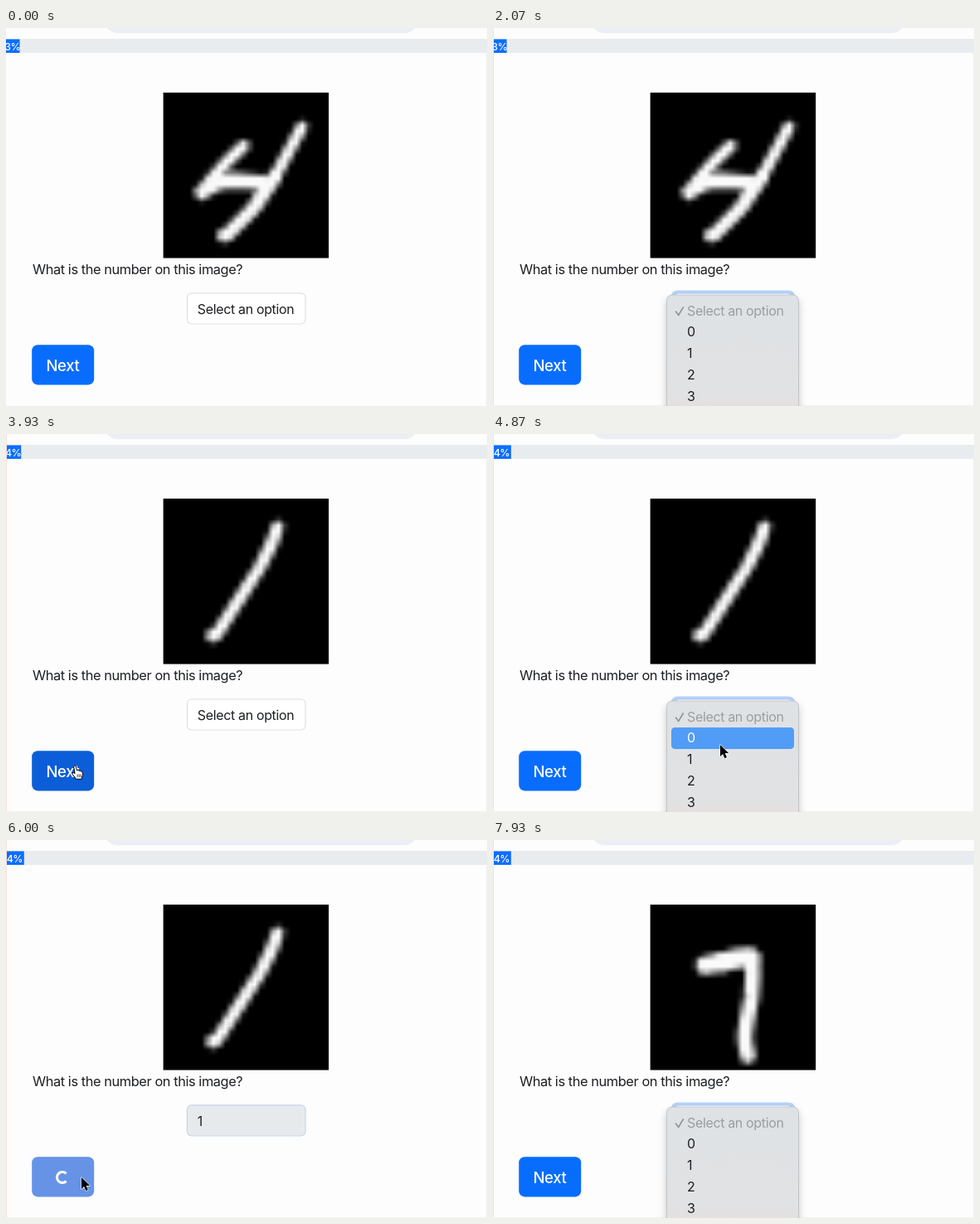
Animation of 580 by 456 pixels, one loop 8 s. Source, as an HTML page with a canvas:

```html
<!DOCTYPE html>
<html lang="en">
<head>
<meta charset="utf-8">
<title>Digit quiz</title>
<style>
  html, body { margin: 0; width: 100%; height: 100%; overflow: hidden; background: #fdfdfd; }
  canvas { position: absolute; left: 189px; top: 78px; width: 200px; height: 200px; transform: translate(.4px, -.3px); }
  svg { position: absolute; left: 0; top: 0; }
  text { font-family: Inter, "Open Sans", sans-serif; font-size: 16px; font-weight: 430; letter-spacing: -.35px; fill: #1d1f22; }
  #ask { font-size: 16.4px; letter-spacing: -.43px; }
  #next { font-size: 18.5px; font-weight: 460; letter-spacing: -.4px; fill: #fff; }
  #percent { font-size: 12.3px; font-weight: 460; letter-spacing: -.4px; fill: #fff; text-anchor: middle; }
</style>
</head>
<body>
<canvas id="digit" width="28" height="28"></canvas>
<svg width="580" height="456" viewBox="0 0 580 456">
  <defs>
    <linearGradient id="glass" gradientUnits="userSpaceOnUse" x1="0" y1="322" x2="0" y2="460">
      <stop offset="0" stop-color="#dfe2e4"/>
      <stop offset=".86" stop-color="#e0e2e4"/>
      <stop offset="1" stop-color="#e6dfde"/>
    </linearGradient>
    <filter id="shade" x="-20%" y="-20%" width="140%" height="140%">
      <feDropShadow dx="0" dy="5" stdDeviation="5" flood-opacity=".22"/>
    </filter>
  </defs>

  <rect x="118" y="-28" width="379" height="34.2" rx="17" fill="#eceef5"/>
  <rect y="13" width="580" height="17" fill="#e9ecef"/>
  <rect id="bar" y="13.5" height="16.5" fill="#0d6efd"/>
  <text id="percent" y="26.5"></text>
  <path d="M579.5 30V456" stroke="#f0f0f1"/>
  <g id="edge" fill="none" stroke="#fbdfda"><path d="M.5 0V456"/><path d="M0 455.5H580" stroke="#f8f0ef"/></g>

  <text id="ask" x="32" y="297">What is the number on this image?</text>

  <rect id="ring" x="214.5" y="316.5" width="150" height="44" rx="8" fill="#b6d2fb"/>
  <rect id="box" x="218.4" y="319.8" width="142.7" height="37.2" rx="5.5" stroke-width="1.2"/>
  <text id="value" x="230.8" y="344.5"></text>

  <rect id="button" x="31.2" y="382.2" width="75" height="48.2" rx="7"/>
  <text id="next" x="48.5" y="413.5">Next</text>
  <path id="spin" d="M72.6 402.4A6.5 6.5 0 1 0 72.6 411.6" fill="none" stroke="#fff" stroke-width="3"/>

  <g id="menu">
    <rect x="209.5" y="322" width="159" height="300" rx="6.5" fill="url(#glass)" stroke="#b9bcbf" stroke-width=".8" filter="url(#shade)"/>
    <rect id="mark" x="215" width="148" height="26" rx="4.5" fill="#519cf6"/>
    <path d="M220.5 342.2l3.2 4.2 5.6-9.4" fill="none" stroke="#8f9194" stroke-width="1.6" stroke-linecap="round"/>
    <text x="234" y="346.5" style="fill:#9b9da0">Select an option</text>
    <g id="rows"></g>
  </g>

  <g id="cursor">
    <path id="arrow" d="M0 0V15.5L3.5 12.2L6 18L8.8 16.8L6.3 11.2H11.3Z" fill="#000" stroke="#fff" stroke-width="1.3" stroke-linejoin="round" paint-order="stroke"/>
    <g id="hand">
      <path d="M0 1.5Q1.5-1 3 1.5L4.2 7Q5.8 5.6 7 7.4Q8.6 6.4 9.6 8.2Q11.6 7.6 12 10V13L10.4 18.5H3.4L-1.8 12Q-2.6 9.6-.4 9.8L1.6 11.2Z" fill="#fff" stroke="#000" stroke-width="1.1" stroke-linejoin="round"/>
      <path d="M5 12V16M7.2 12V16M9.3 12V16" stroke="#000" stroke-width=".8"/>
    </g>
  </g>
</svg>
<script>
const LOOP = 8000;
const $ = id => document.getElementById(id);
const clamp = v => Math.max(0, Math.min(1, v));
const inside = (t, spans) => spans.some(([a, b]) => t >= a && t < b);
const show = (id, on) => $(id).setAttribute('visibility', on ? 'visible' : 'hidden');
const set = (id, attrs) => { for (const k in attrs) $(id).setAttribute(k, attrs[k]); };

// time, x, y of the pointer tip
const route = [
  [0, 262, 470], [70, 265, 452], [400, 296, 352], [670, 282, 339], [1670, 282, 339],
  [1930, 276, 462], [2200, 275, 471], [2330, 268, 468], [2800, 56, 412], [2930, 55, 407.5],
  [3800, 55, 407.5], [4400, 276, 342], [4670, 276, 342], [4870, 274, 375], [5070, 272, 392],
  [5330, 272, 392], [5730, 91, 407], [6400, 91, 407], [6900, 288, 345], [7400, 288, 345],
  [7600, 280, 462], [LOOP, 280, 470]
];
const opened = [[1200, 2270], [4600, 5270], [6990, LOOP]];
const focused = [[1400, 2950], [4730, 5740], [7200, LOOP]];
const pressed = [[2950, 3070], [5740, 5800]];
const waiting = [[3070, 3700], [5800, 6500]];
const answers = [[2270, 3700, '4'], [5270, 6500, '1']];

// digits in stage coordinates: stroke width, path
const digits = {
  4: [[14.5, 'M286 142Q263 162 243 187'], [18, 'M236 198Q253 186 272 184L310 187'],
      [14.5, 'M356 120Q344 142 324 179'], [16.5, 'M324 179Q300 222 267 249L262 250']],
  1: [[15, 'M327 112Q322 133 306 160L253 242L248 243']],
  7: [[22, 'M255 151L282 146'], [23, 'M276 147Q292 141 309 141'],
      [18, 'M312 142Q314 165 311 190Q306 212 303 236Q303 250 307 260']]
};
let drawn;

function drawDigit(name) {
  if (name === drawn) return;
  drawn = name;
  const c = $('digit').getContext('2d');
  const k = 28 / 200;
  c.setTransform(k, 0, 0, k, -189 * k, -78 * k);
  c.fillStyle = '#000';
  c.fillRect(189, 78, 200, 200);
  c.strokeStyle = '#fafafa';
  c.lineCap = c.lineJoin = 'round';
  for (const [width, d] of digits[name]) {
    c.lineWidth = width;
    c.stroke(new Path2D(d));
  }
}

function pointer(t) {
  const i = route.findIndex(p => p[0] > t);
  const [a, b] = [route[i - 1], route[i]];
  const u = (t - a[0]) / (b[0] - a[0]);
  const e = u * u * (3 - 2 * u);
  return [a[1] + (b[1] - a[1]) * e, a[2] + (b[2] - a[2]) * e];
}

function render(t) {
  const [x, y] = pointer(t);
  const menu = inside(t, opened);
  const busy = inside(t, waiting);
  const over = x > 31 && x < 106 && y > 382 && y < 430;
  const answer = answers.find(([a, b]) => t >= a && t < b);

  drawDigit(t < 3700 ? 4 : t < 6500 ? 1 : 7);
  show('edge', t >= 70);

  const grow = clamp((t - 3700) / 600);
  const width = 16.5 + 5.3 * grow * grow * (3 - 2 * grow);
  set('bar', { width });
  set('percent', { x: width / 2 - .5 });
  $('percent').textContent = t < 3700 ? '3%' : '4%';

  const blur = focused.find(([, b]) => t >= b && t < b + 50);
  const ring = inside(t, focused) ? 1 : blur ? .5 * (1 - (t - blur[1]) / 50) : 0;
  set('ring', { opacity: ring });
  set('box', {
    fill: busy ? '#e7eaed' : '#fff',
    stroke: ring || menu ? '#a9caf3' : answer ? '#c3d8ee' : '#dee2e6'
  });
  $('value').textContent = answer ? answer[2] : 'Select an option';

  const color = busy ? '#6693e6' : inside(t, pressed) ? '#0758cb' : over ? '#0b5ed7' : '#086dfd';
  set('button', { fill: color });
  show('next', !busy);
  show('spin', busy);
  set('spin', { transform: `rotate(${(t - 6000) / 750 * 360} 68 407)` });

  show('menu', menu);
  const row = menu && y >= 354 ? Math.floor((y - 354) / 26) : -1;
  show('mark', row >= 0);
  set('mark', { y: 354 + 26 * Math.max(row, 0) });
  [...$('rows').children].forEach((el, i) => el.style.fill = i === row ? '#fff' : '');

  const hand = over && !busy;
  set('cursor', { transform: `translate(${x} ${y}) scale(.9)` });
  show('cursor', t >= 70);
  set('arrow', { display: hand ? 'none' : 'inline' });
  set('hand', { display: hand ? 'inline' : 'none' });
}

for (let i = 0; i < 5; i++) {
  const el = document.createElementNS('http://www.w3.org/2000/svg', 'text');
  el.setAttribute('x', 234);
  el.setAttribute('y', 372.2 + 26 * i);
  el.textContent = i;
  $('rows').append(el);
}

let start;
function tick(now) {
  start ??= now;
  render((now - start) % LOOP);
  requestAnimationFrame(tick);
}
render(0);
requestAnimationFrame(tick);
</script>
</body>
</html>
```
